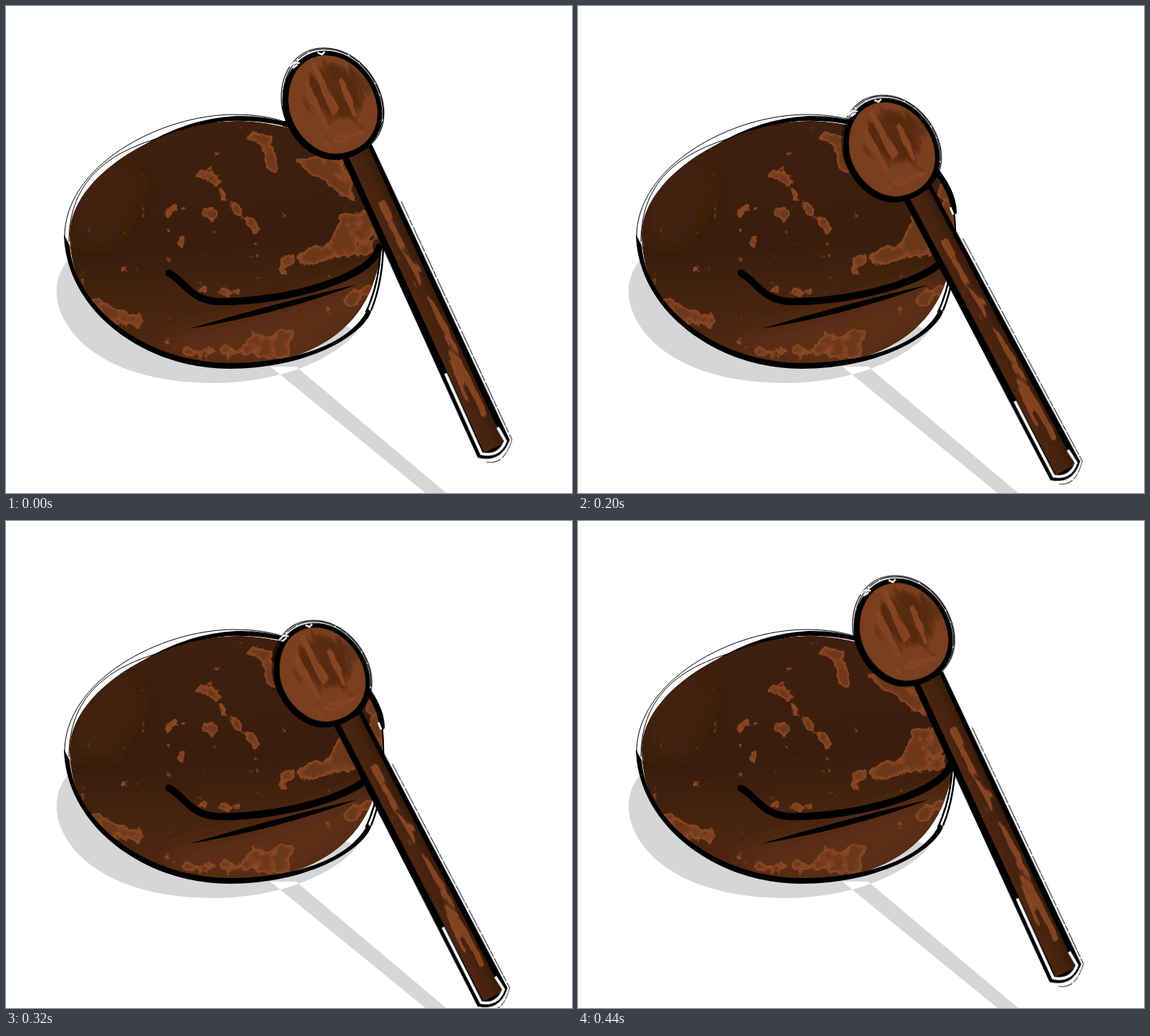
Animation, 792 px wide and 682 px high, one loop 480 ms. Source, as an HTML page:

```html
<!DOCTYPE html>
<html lang="en">
<head>
<meta charset="utf-8">
<title>Wooden fish</title>
<style>
html, body { margin: 0; width: 100%; height: 100%; overflow: hidden; background: #fff; }
svg { display: block; width: 792px; height: 682px; }
.ink { fill: none; stroke: #000; stroke-linecap: round; stroke-linejoin: round; }
.gap { fill: none; stroke: #fff; }
.spots { fill: none; stroke: #000; stroke-linecap: round; stroke-linejoin: round; }
.spots .area { fill: #000; stroke: none; }
#mallet { will-change: transform; }
</style>
</head>
<body>
<svg viewBox="0 0 792 682">
<defs>
  <path id="shell" d="M89 320C89 240 215 161 322 161C420 161 526 215 526 300C532 432 450 503 312 503C195 503 89 432 89 320Z"/>
  <path id="egg" d="M447 69C490 69 520 115 520 150S492 207 460 207 395 170 395 132 417 69 447 69Z"/>
  <clipPath id="inShell"><use href="#shell"/></clipPath>
  <clipPath id="inEgg"><use href="#egg"/></clipPath>
  <clipPath id="inStick"><path d="M-14 3H17V458H-14Z"/></clipPath>
  <linearGradient id="wood" x2=".1" y2="1">
    <stop offset="0" stop-color="#40200e"/><stop offset=".55" stop-color="#391d0c"/>
    <stop offset=".8" stop-color="#482410"/><stop offset="1" stop-color="#502812"/>
  </linearGradient>
  <linearGradient id="cane">
    <stop offset="0" stop-color="#4b2610"/><stop offset=".6" stop-color="#45220f"/><stop offset="1" stop-color="#381b0b"/>
  </linearGradient>
  <filter id="soft" x="-50%" y="-50%" width="200%" height="200%"><feGaussianBlur stdDeviation="14"/></filter>
</defs>

<path fill="#d6d6d6" d="M86 357C40 410 95 528 290 528C390 528 465 490 492 455L300 380ZM370 505 406 505 616 682H587Z"/>

<g id="body">
  <g clip-path="url(#inShell)">
    <use href="#shell" fill="url(#wood)"/>
    <g filter="url(#soft)">
      <path fill="#5c2f15" d="M240 460 340 435 520 370 500 440 390 510 220 490Z"/>
      <path fill="#43220f" d="M100 260 160 215 190 250 150 330 100 330Z"/>
    </g>
    <g class="spots" filter="url(#patina)" stroke-width="12">
      <path d="M345 182 366 186M362 195 376 230M272 236 298 245M300 262 350 312M280 290H292"/>
      <path stroke-width="8" d="M222 294 240 278M244 334 252 316M240 483H320M270 398 330 402M350 378H356"/>
      <path stroke-width="15" d="M125 415 150 432 188 440M478 415 515 395M514 250 522 310"/>
      <path class="area" d="M393 213 470 212 495 278 430 236ZM470 290 525 295 515 345 400 364 372 354 450 335ZM318 492 340 464 410 450 390 494Z"/>
    </g>
  </g>
  <path class="ink" stroke-width="10" d="M228 374C250 385 258 414 300 414C400 414 515 378 522 338"/>
  <path d="M256 452Q370 418 491 390Q380 432 256 452Z"/>
  <path d="M81 320C84 428 195 508 312 508C425 508 500 460 511 428L506 424C485 470 410 500 312 500C200 500 96 425 89 335Z"/>
  <path d="M186 199Q250 158 322 154Q360 153 392 163L390 168Q350 159 310 161Q240 168 186 199Z"/>
  <path class="ink" d="M82 325C80 225 215 151 322 152Q360 152 390 162M88 330C88 240 150 204 213 185"/>
  <path class="ink" stroke-width="8" d="M390 165Q470 185 503 233Q525 262 526 288"/>
  <path class="ink" stroke-width="2.5" d="M526 285Q534 370 511 426M524 340Q522 390 504 428"/>
  <path class="gap" stroke-width="3" d="M521 282 525 292"/>
</g>

<g id="mallet">
  <g transform="translate(491 203) rotate(-24.6)">
    <path d="M-23 0H23L26 457Q1 482-25 461Z"/>
    <path fill="url(#cane)" d="M-14 3H17V458H-14Z"/>
    <g class="spots" clip-path="url(#inStick)">
      <path filter="url(#streak)" stroke-width="8" d="M2 80 3 170 8 280 0 330-5 380M8 300 9 410"/>
    </g>
    <path class="gap" stroke-width="4" d="M-17 335-18 458Q2 473 20 456L18 434"/>
    <path class="ink" stroke-dasharray="26 2 9 3" d="M27 90 29 458Q4 486-16 472"/>
  </g>
  <use href="#egg" class="ink" stroke-width="13"/>
  <use href="#egg" class="ink" stroke-width="13" transform="translate(-2 2)"/>
  <use href="#egg" class="ink" transform="translate(457 136) scale(1.15 1.12) translate(-457.5 -138)"/>
  <use href="#egg" class="ink" stroke-dasharray="30 3 14 2" transform="translate(457 136) scale(1.12 1.1) translate(-457 -138)"/>
  <path class="gap" stroke-width="2.5" d="M397 85 403 79 411 80M436 65 442 68 446 64M401 87 408 82"/>
  <g clip-path="url(#inEgg)">
    <use href="#egg" fill="#7a3f1e"/>
    <g transform="rotate(-24 457 137)">
      <ellipse filter="url(#grain)" cx="470" cy="124" rx="42" ry="44"/>
      <path class="spots" filter="url(#streak)" stroke-width="7" d="M436 95V165M454 75V150M480 110V165M440 185 480 190"/>
    </g>
  </g>
</g>
</svg>
<script>
// Ragged stain: a blurred shape plus noise, cut at a threshold, with a rim and a darker core
function stain(id, frequency, blur, rim, core) {
  const layer = (slope, cut, colour, name) => `
    <feComponentTransfer in="sum"><feFuncA type="linear" slope="${slope}" intercept="${-slope * cut}"/></feComponentTransfer>
    <feComposite in2="SourceAlpha" operator="over" result="unused${name}"/>
    <feComponentTransfer in="sum" result="cut${name}"><feFuncA type="linear" slope="${slope}" intercept="${-slope * cut}"/></feComponentTransfer>
    <feFlood flood-color="${colour}"/><feComposite in2="cut${name}" operator="in" result="${name}"/>`
    .replace(/<feComponentTransfer in="sum">[^]*?result="unused\w+"\/>/, '');
  return `<filter id="${id}" x="-100%" y="-100%" width="300%" height="300%" color-interpolation-filters="sRGB">
    <feTurbulence type="fractalNoise" baseFrequency="${frequency}" numOctaves="5" seed="4"/>
    <feColorMatrix values="0 0 0 0 0  0 0 0 0 0  0 0 0 0 0  1 0 0 0 0" result="noise"/>
    <feGaussianBlur in="SourceAlpha" stdDeviation="${blur}"/>
    <feComposite in2="noise" operator="arithmetic" k2=".6" k3="1" k4="-.3" result="sum"/>
    ${layer(12, .46, rim, 'rim')}${layer(5, .58, core, 'core')}
    <feMerge><feMergeNode in="rim"/><feMergeNode in="core"/></feMerge></filter>`;
}
document.querySelector('defs').insertAdjacentHTML('beforeend',
  stain('patina', '.05', 5, '#8a4824', '#6c381b') +
  stain('streak', '.09 .02', 2.5, '#884624', '#80421f') +
  stain('grain', '.08 .02', 9, '#693519', '#57290f'));

// The swing: one sine per loop for head and grip, plus a small jolt shared by both
const STEPS = 12, STEP_MS = 40;
function pose(step) {
  const a = 2 * Math.PI * step / STEPS;
  const jolt = 1.6 * Math.sin(2 * a) - 3 * Math.cos(3 * a);
  return {
    x: 446.5 + 9.7 * Math.cos(a),
    y: 179.8 + 43.6 * Math.cos(a - 3.64) + jolt,
    gripX: 682.5 + Math.cos(a - 1),
    gripY: 644.7 + 26.7 * Math.cos(a - 3.85) + jolt
  };
}
const span = p => Math.hypot(p.gripX - p.x, p.gripY - p.y);
const tilt = p => Math.atan2(p.gripY - p.y, p.gripX - p.x);
const rest = pose(0);
const frames = Array.from({ length: STEPS + 1 }, (_, i) => {
  const p = pose(i);
  return {
    transform: `translate(${p.x}px,${p.y}px) rotate(${tilt(p) - tilt(rest)}rad) ` +
      `scale(${span(p) / span(rest)}) translate(${-rest.x}px,${-rest.y}px)`,
    offset: i / STEPS,
    easing: 'step-end'
  };
});
document.getElementById('mallet').animate(frames, { duration: STEPS * STEP_MS, iterations: Infinity });
</script>
</body>
</html>
```
